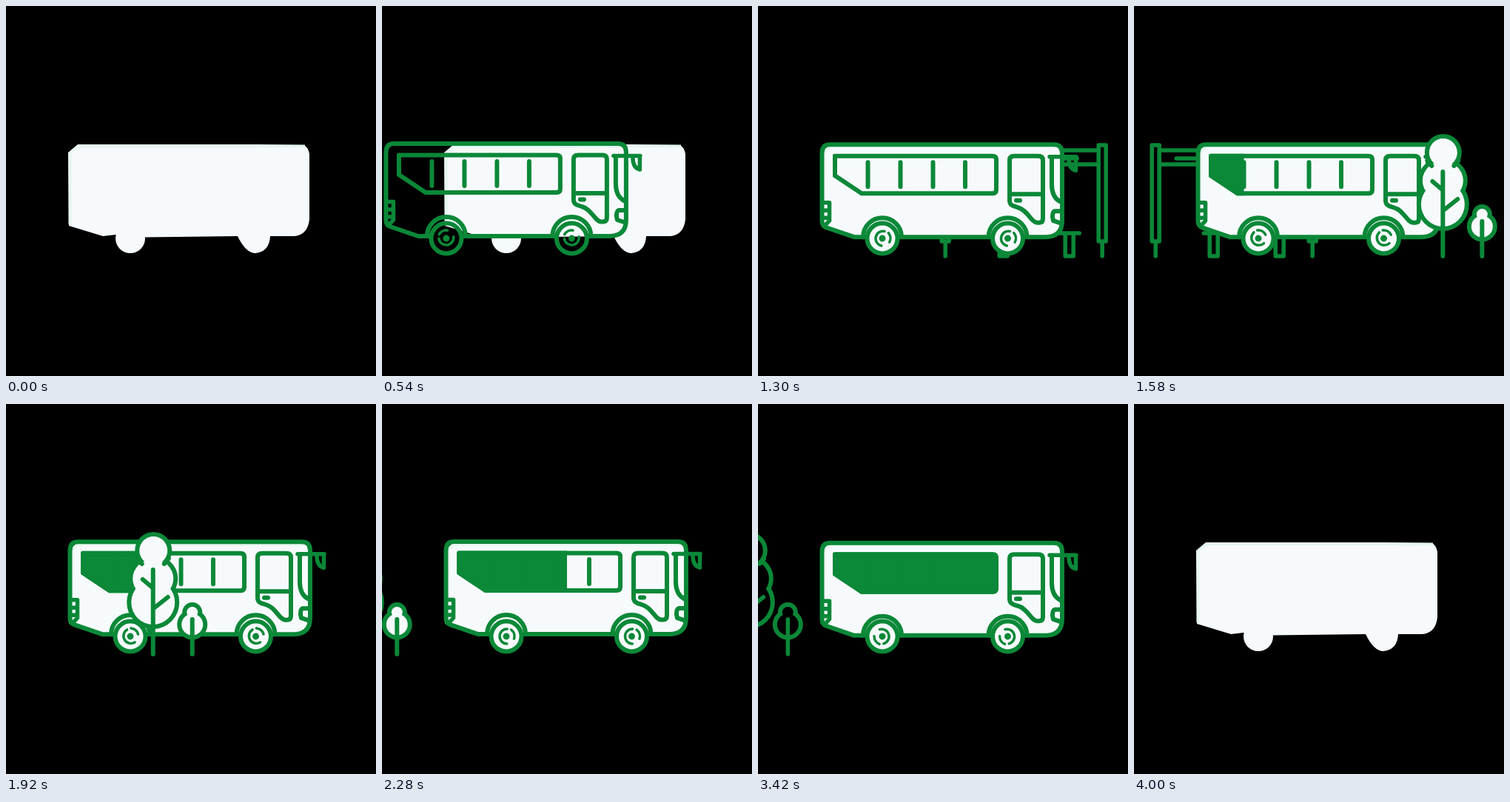
Recreate the animation shown at these times as an HTML page. Size 500 by 500 pixels, loop 4.26 s.

```html
<!DOCTYPE html>
<html lang="en">
<head>
<meta charset="utf-8">
<title>Bus ride</title>
<style>
  html, body { margin: 0; width: 100%; height: 100%; overflow: hidden; background: #000; }
  svg { display: block; width: 100vw; height: 100vh; }
  .line { fill: none; stroke: #0b8838; stroke-width: 6; stroke-linecap: round; stroke-linejoin: round; }
  .thin { stroke-width: 5.5; }
  .rim { stroke-width: 12; }
  .dot { fill: #0b8838; stroke: none; }
  .pale { fill: #f7fafc; }
  .leaf { stroke: none; }
</style>
</head>
<body>
<svg viewBox="0 0 500 500">
  <defs>
    <g id="bigCrown">
      <circle cx=".5" cy="198" r="19"/>
      <ellipse cy="236" rx="27.500" ry="26"/>
      <ellipse cy="268" rx="29.500" ry="30"/>
    </g>
    <g id="smallCrown">
      <circle cy="281.500" r="7.500"/>
      <circle cy="298" r="14.500"/>
    </g>
    <g id="smallTree">
      <use href="#smallCrown" class="rim"/>
      <use href="#smallCrown" class="leaf"/>
      <path d="M0 291V338"/>
    </g>
    <g id="trees">
      <use href="#bigCrown" class="rim"/>
      <use href="#bigCrown" class="leaf"/>
      <path d="M-21 209Q-19 213 -15 216M21 209Q19 213 15 216"/>
      <path d="M0 224V338M-14 237L-1 248M20 261L1 276"/>
      <use href="#smallTree" x="53"/>
    </g>
    <g id="wheel">
      <circle r="20.500"/>
      <g class="spin" stroke-width="3.500">
        <path d="M1 -10A10 10 0 0 0 1 10M6.500 -9A11 11 0 0 1 10.500 3"/>
        <circle class="dot" r="4.500"/>
      </g>
    </g>
    <path id="pane" d="M104 201.500H317Q322 201.500 322 206V247Q322 252 317 252H140L104 228Z"/>
    <clipPath id="fillClip"><rect id="fillEdge" x="95" y="190" height="75"/></clipPath>
  </defs>

  <g id="stop" class="line thin">
    <path d="M2 2H12V132H2ZM7 132V152M214 2H224V132H214ZM219 132V152"/>
    <path d="M14 9H214M14 28H214M35 20H185M72 121H188M80 124V152H91V124M169 124V152H180V124"/>
  </g>
  <g id="backTrees" class="line thin" style="fill:#000">
    <use href="#smallTree" transform="translate(-71 29) scale(.9)"/>
    <use href="#trees"/>
  </g>

  <g class="pale">
    <path d="M84 198L97 187H340L403 188Q409 192 410 200V288Q408 309 390 311H357L313 311L188 312.500L148 309L131 311L85 297Z"/>
    <circle cx="168" cy="314" r="20"/>
    <path d="M313 311Q324 334 337 334Q356 332 357 311Z"/>
    <path d="M86.500 295V199L98 189.500H404" fill="none" stroke="#e5f7f0" stroke-width="4"/>
  </g>

  <g id="bus" class="line">
    <g id="body">
      <path d="M361 311H390Q411 310 411 289V198Q411 186 400 186H97Q86.500 186 86.500 198V289Q86.500 296 92 298L130 311H145M191 311H314"/>
      <path d="M142 311A26 26 0 0 1 194 311M311.500 311A26 26 0 0 1 363.500 311"/>
      <use href="#pane"/>
      <use href="#pane" fill="#0b8838" clip-path="url(#fillClip)"/>
      <path d="M148.500 210V243M192.500 210V243M236.500 210V243M280 210V243"/>
      <path d="M346 201.500H379Q385 201.500 385 207V286Q385 291.500 380 291.500H377C369 291 364 274 351 271L345 269Q340 267 340 262V207Q340 201.500 346 201.500ZM340 253H385M349 261.500H354"/>
      <path d="M397 203V240Q397 257 408 263M408 276H401Q398 277 398 284L399 289L408 292"/>
      <path d="M394 202.500H430M429.500 203V221Q420 219 420 204" class="thin"/>
      <path d="M88 264.500H96.500V289L90 296M88 275H96M88 285H96" class="thin"/>
    </g>
    <use href="#wheel" x="168" y="314"/>
    <use href="#wheel" x="337.500" y="314"/>
  </g>

  <g id="frontTrees" class="line" style="fill:#f7fafc"><use href="#trees"/></g>
</svg>
<script>
  const LOOP = 4260;
  const byId = id => document.getElementById(id);
  const [stop, backTrees, frontTrees, bus, body, edge] =
    ['stop', 'backTrees', 'frontTrees', 'bus', 'body', 'fillEdge'].map(byId);
  const spin = document.querySelectorAll('.spin')[0];

  const progress = (t, from, to) => Math.min(1, Math.max(0, (t - from) / (to - from)));
  const move = (el, x, y = 0) => el.setAttribute('transform', `translate(${x} ${y})`);
  // Scenery at x when the clock reads `at`, sliding left at a constant speed.
  const slide = (t, x, at, speed) => x - speed * (t - at);

  function draw(t) {
    const arrive = 1 - progress(t, 230, 775);
    const leave = progress(t, 3470, 3995);
    move(bus, 440 * (leave ** 2 - arrive ** 2));
    move(body, 0, 0.9 * (1 - Math.cos((t - 995) / 440 * 2 * Math.PI)));
    spin.setAttribute('transform', `rotate(${(t - 960) / 330 * 360})`);

    const filled = Math.sin(progress(t, 1290, 3440) * Math.PI / 2);
    edge.setAttribute('width', 6 + 225 * filled);

    move(stop, slide(t, 23, 1580, 0.8), 186);
    move(frontTrees, slide(t, 418, 1580, 0.643));
    move(backTrees, slide(t, 337, 2920, 0.698));
  }

  const start = performance.now();
  function tick() {
    draw((performance.now() - start) % LOOP);
    requestAnimationFrame(tick);
  }
  tick();
</script>
</body>
</html>
```
